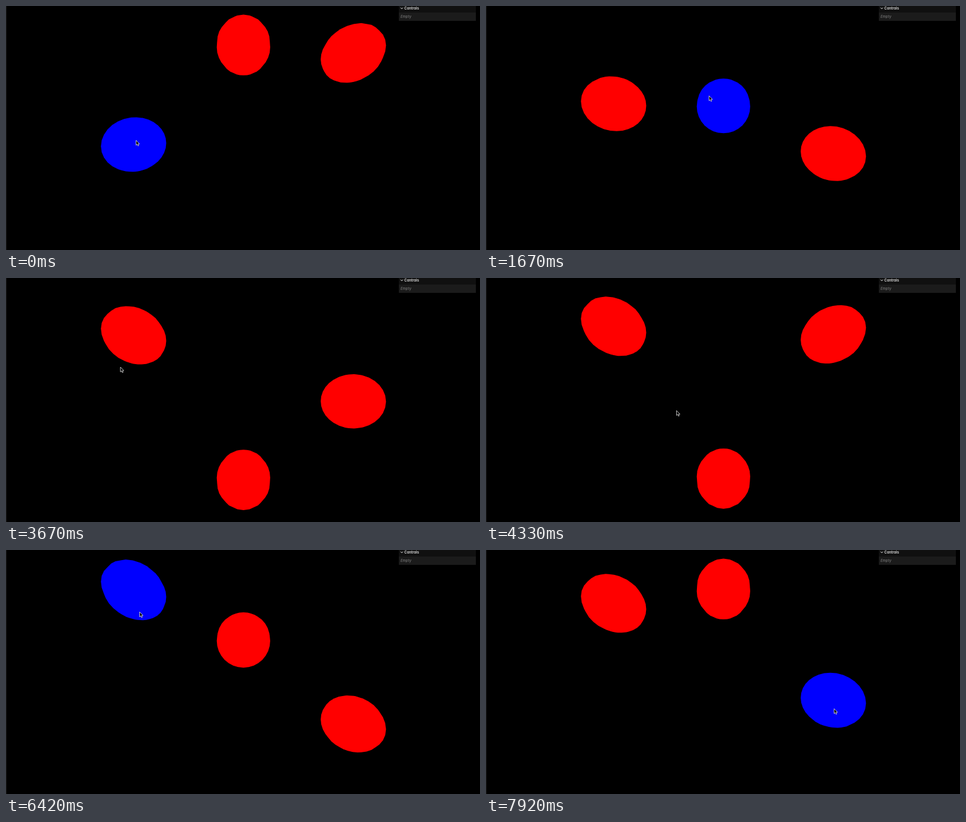
An HTML page with a canvas that plays this animation: 800 by 411 pixels, repeating every 8 s.

```html
<!DOCTYPE html>
<html lang="en">
<head>
<meta charset="utf-8">
<title>Hover spheres</title>
<style>
  html, body { margin: 0; width: 100%; height: 100%; overflow: hidden; background: #000; }
  canvas { display: block; position: absolute; left: 0; top: 0; }
  .edge { position: absolute; left: 0; top: 0; width: 1px; height: 100%; background: #1a1a1a; }
  .panel {
    position: absolute; left: 663px; top: 0; width: 130px; height: 25px;
    background: #1b1b1b; color: #ebebeb; font: 6px Inter, Roboto, sans-serif;
  }
  .title { height: 10.5px; background: #101010; }
  .panel span { position: absolute; line-height: 8px; white-space: nowrap; }
  .title span { left: 9.3px; top: 0; font-weight: 600; }
  .empty { left: 3px; top: 14px; font-style: italic; color: #858585; }
  .panel svg { position: absolute; left: 2px; top: 1px; }
</style>
</head>
<body>
<canvas id="stage" width="800" height="411"></canvas>
<div class="edge"></div>
<div class="panel">
  <div class="title">
    <svg width="6" height="6"><path d="M1 1.7 L3 3.8 L5 1.7" fill="none" stroke="#ebebeb" stroke-width="1"/></svg>
    <span>Controls</span>
  </div>
  <span class="empty">Empty</span>
</div>
<script>
const ctx = document.getElementById('stage').getContext('2d');
const LOOP = 8000, FRAME = 1000 / 12, START = 41.198;
const CENTER = { x: 400.8, y: 204.8 }, FOCAL = 270.5, DEPTH = 3;
const RADIUS = 0.5, SEGMENTS = 16, AMPLITUDE = 1.5;

const spheres = [
  { x: -2, speed: 0.3 },
  { x: 0, speed: 0.8 },
  { x: 2, speed: 1.4 },
];

// Pointer stops: seconds, x, y
const stops = [
  [0, 219, 226], [1.667, 376, 151], [2.917, 591, 343], [3.84, 152, 130],
  [4.333, 321, 223], [5.417, 575, 151], [6.417, 225, 104], [7.917, 587, 267],
];

const mesh = [];
for (let i = 0; i <= SEGMENTS; i++) {
  const theta = i / SEGMENTS * Math.PI;
  for (let j = 0; j < SEGMENTS; j++) {
    const phi = j / SEGMENTS * 2 * Math.PI;
    mesh.push([
      RADIUS * Math.cos(phi) * Math.sin(theta),
      RADIUS * Math.cos(theta),
      RADIUS * Math.sin(phi) * Math.sin(theta),
    ]);
  }
}

function halfHull(points) {
  const hull = [];
  for (const p of points) {
    while (hull.length > 1) {
      const [a, b] = hull.slice(-2);
      if ((b[0] - a[0]) * (p[1] - a[1]) - (b[1] - a[1]) * (p[0] - a[0]) > 0) break;
      hull.pop();
    }
    hull.push(p);
  }
  return hull.slice(0, -1);
}

// The outline of a convex mesh is the hull of its projected vertices.
function outline(cx, cy) {
  const points = mesh.map(([x, y, z]) => {
    const scale = FOCAL / (DEPTH - z);
    return [CENTER.x + (cx + x) * scale, CENTER.y - (cy + y) * scale];
  }).sort((a, b) => a[0] - b[0] || a[1] - b[1]);
  const path = new Path2D();
  const lower = halfHull(points), upper = halfHull(points.reverse());
  for (const [x, y] of [...lower, ...upper]) path.lineTo(x, y);
  path.closePath();
  return path;
}

function slope(i, axis) {
  if (i === 0 || i === stops.length - 1) return 0;
  const rate = k => (stops[k + 1][axis] - stops[k][axis]) / (stops[k + 1][0] - stops[k][0]);
  const before = rate(i - 1), after = rate(i);
  return before * after > 0 ? 2 * before * after / (before + after) : 0;
}

// Monotone cubic between the stops
function pointer(t, axis) {
  let i = 0;
  while (i < stops.length - 2 && t > stops[i + 1][0]) i++;
  const a = stops[i], b = stops[i + 1], span = b[0] - a[0];
  const u = Math.min(1, (t - a[0]) / span), v = 1 - u;
  return a[axis] * v * v * (1 + 2 * u) + b[axis] * u * u * (3 - 2 * u)
    + span * u * v * (slope(i, axis) * v - slope(i + 1, axis) * u);
}

const arrow = new Path2D('M0 0 V8.2 L1.9 6.5 L3.2 9.4 L4.6 8.8 L3.3 6 H5.8 Z');

function drawPointer(x, y) {
  ctx.save();
  ctx.translate(x + 0.5, y + 0.3);
  ctx.fillStyle = '#000';
  ctx.strokeStyle = '#e6e6e6';
  ctx.lineWidth = 0.8;
  ctx.fill(arrow);
  ctx.stroke(arrow);
  ctx.restore();
}

function draw() {
  const now = performance.now() % LOOP;
  const t = Math.floor((now + 5) / FRAME) % 96 * FRAME / 1000;
  const px = pointer(t, 1), py = pointer(t, 2);
  ctx.clearRect(0, 0, 800, 411);
  for (const { x, speed } of spheres) {
    const shape = outline(x, AMPLITUDE * Math.sin(speed * (START + t)));
    ctx.fillStyle = ctx.isPointInPath(shape, px, py) ? '#00f' : '#f00';
    ctx.fill(shape);
  }
  drawPointer(px, py);
  requestAnimationFrame(draw);
}
draw();
</script>
</body>
</html>
```
